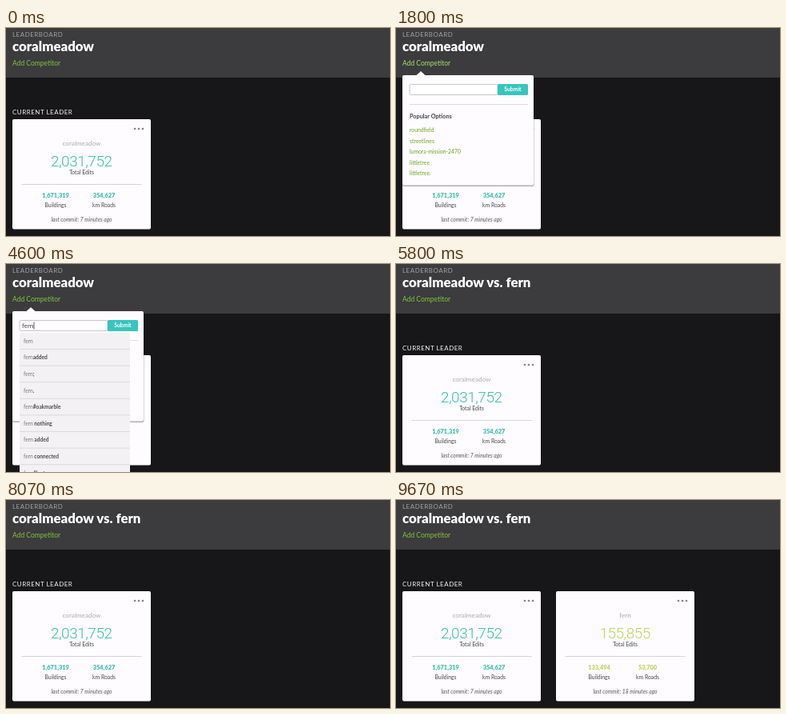
Animation, 480 px wide and 260 px high, one loop 9.74 s. Source, as an HTML page:

```html
<!DOCTYPE html>
<html lang="en">
<head>
<meta charset="utf-8">
<title>Leaderboard</title>
<style>
html, body { margin: 0; width: 100%; height: 100%; overflow: hidden; background: #171618; }
svg { display: block; width: 480px; height: 260px; font: 6.8px Lato, sans-serif; }
text { white-space: pre; }
.mid { text-anchor: middle; }
.bold { font-weight: 700; }
.caps { font-size: 8px; letter-spacing: .5px; }
.total { font: 300 19px Roboto, sans-serif; letter-spacing: -.5px; }
.count { font-size: 7.4px; font-weight: 900; }
.name { font-size: 8.2px; fill: #aaa; }
</style>
</head>
<body>
<svg id="stage" viewBox="0 0 480 260"></svg>
<script>
const LOOP = 9740;
const LEADER = "coralmeadow", RIVAL = "fern";
const OPTIONS = ["roundfield", "streetlines", "lumora-mission-2470", "littletree", "littletree."];
const ENDINGS = ["", "added", ";", ".", "#oakmarble", " nothing", " added", " connected", "#lanterns"];
const KEYS = [2670, 2800, 3070, 3200];

const text = (x, y, s, fill, attrs = "") => `<text x="${x}" y="${y}" fill="${fill}" ${attrs}>${s}</text>`;
const rect = (x, y, w, h, fill, attrs = "") =>
  `<rect x="${x}" y="${y}" width="${w}" height="${h}" fill="${fill}" ${attrs}/>`;
const mid = (x, y, s, fill, cls = "") => text(x, y, s, fill, `class="mid ${cls}"`);

function card(id, x, color, name, total, buildings, roads, age) {
  const dots = [153, 158, 163].map(cx => `<circle cx="${cx}" cy="12" r="1.3" fill="#858386"/>`).join("");
  return `<g id="${id}" transform="translate(${x} 114)">
    ${rect(0, 0, 173, 137.5, "#fefcff", 'rx="2"')}${dots}
    ${mid(86.5, 33, name, "#aaa", "name")}
    ${mid(86.2, 59, total, color, "total")}
    ${mid(86.5, 69, "Total Edits", "#444")}
    ${rect(11.5, 81, 150, 1, "#d5d3d6")}
    ${mid(54, 98, buildings, color, "count")}${mid(114.5, 98, roads, color, "count")}
    ${mid(54, 110, "Buildings", "#444")}${mid(114.5, 110, "km Roads", "#444")}
    ${text(86.5, 128, `last commit: ${age} minutes ago`, "#555", 'class="mid" font-style="italic"')}
  </g>`;
}

const popover = `<g id="popover">
  ${rect(8, 60, 164.5, 138, "#000", 'rx="2" opacity=".3"')}
  ${rect(8, 59, 164, 137.5, "#fefcff", 'rx="2"')}
  <path d="M25 59.5L31 54L37 59.5Z" fill="#fefcff"/>
  ${rect(17, 70.5, 110, 13, "#fff", 'rx="1.5" stroke="#c8c6c9"')}
  ${rect(127, 70, 38, 14, "#37c5bd", 'id="button" rx="1.5"')}
  ${mid(146, 79.4, "Submit", "#fff", "bold")}
  ${text(20, 80, "", "#444", 'id="query" font-size="8"')}
  ${rect(20, 72.5, .8, 9, "#333", 'id="caret"')}
  ${rect(17, 95, 148, 1, "#dddbde")}
  ${text(17, 113, "Popular Options", "#444", 'class="bold" font-size="7.3"')}
  ${OPTIONS.map((s, i) => text(17, 130 + 13.5 * i, s, "#6da324")).join("")}
  <g id="list">
    ${rect(17, 86, 138, 180, "#f3f1f4")}
    ${ENDINGS.map((s, i) => text(22, 98.7 + 20.6 * i,
      `<tspan class="prefix"></tspan><tspan class="bold" fill="#4c4a4d">${s}</tspan>`, "#777", 'font-size="6.6"') +
      rect(17, 106 + 20.6 * i, 138, 1, "#dcdadd")).join("")}
  </g>
</g>`;

const $ = id => document.getElementById(id);
$("stage").innerHTML =
  rect(0, 0, 480, 260, "#171618") + rect(0, 0, 480, 62, "#3c3b3d") +
  text(8, 11, "LEADERBOARD", "#a3a1a4", 'class="caps"') +
  text(8, 29.3, LEADER, "#fff", 'id="title" font-size="16.8" font-weight="900"') +
  text(8, 47, "Add Competitor", "#7dc63c", 'id="link" font-size="8.5"') +
  text(8, 108, "CURRENT LEADER", "#f4f2f5", 'class="caps"') +
  card("first", 8, "#39bdab", LEADER, "2,031,752", "1,671,319", "354,627", 7) +
  card("second", 200, "#bdd45c", RIVAL, "155,855", "133,494", "53,700", 18) +
  popover;

const prefixes = document.querySelectorAll(".prefix");
const ramp = (t, start, length) => Math.min(1, Math.max(0, (t - start) / length));
const within = (t, a, b) => t >= a && t < b;
const show = (id, on) => $(id).setAttribute("visibility", on ? "inherit" : "hidden");

function draw(t) {
  const typed = RIVAL.slice(0, KEYS.filter(k => t >= k).length);
  const open = ramp(t, 1270, 130) - ramp(t, 5600, 130);

  $("title").textContent = t >= 5730 ? `${LEADER} vs. ${RIVAL}` : LEADER;
  $("link").setAttribute("fill", within(t, 670, 1900) ? "#a8e268" : "#7dc63c");
  $("popover").setAttribute("opacity", open);
  $("popover").setAttribute("visibility", open > 0 ? "visible" : "hidden");
  $("button").setAttribute("fill", within(t, 5330, 5730) ? "#2fb0a9" : "#37c5bd");
  $("query").textContent = typed;
  $("caret").setAttribute("x", 20.3 + (typed ? $("query").getComputedTextLength() : 0));
  show("caret", within(t, 2200, 3670) || within(t, 4100, 5400));
  show("list", within(t, 2930, 5600));
  prefixes.forEach(p => p.textContent = typed);
  $("second").setAttribute("opacity", ramp(t, 8230, 130));
}

const start = performance.now();
function tick() {
  draw((performance.now() - start) % LOOP);
  requestAnimationFrame(tick);
}
tick();
</script>
</body>
</html>
```
